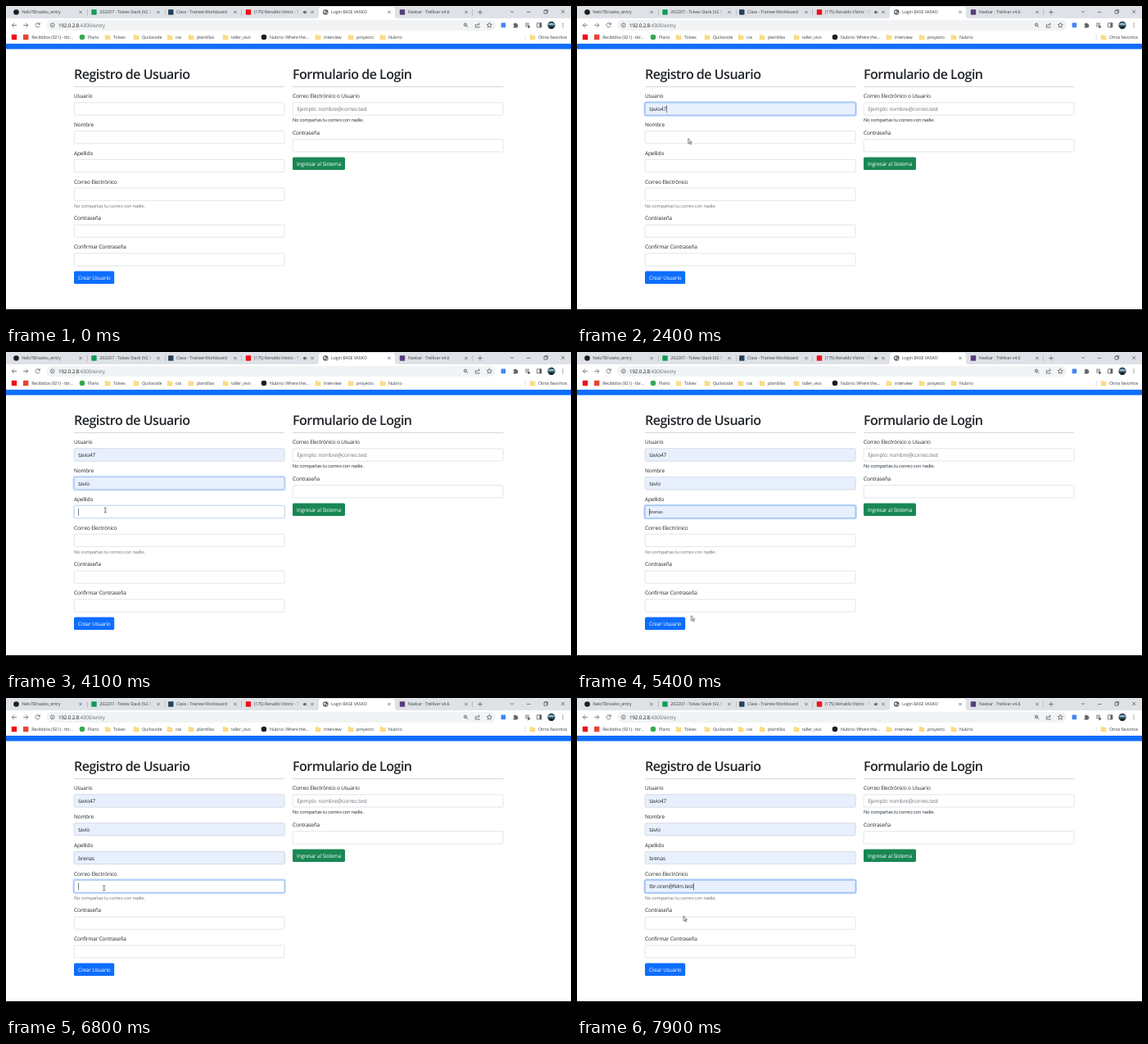
An HTML page for the animation above (8000 ms loop, 690 by 388 pixels).

```html
<!DOCTYPE html>
<html lang="es">
<head>
<meta charset="utf-8">
<title>Registro</title>
<style>
html, body { margin: 0; width: 100%; height: 100%; overflow: hidden; background: #fff; }
svg { display: block; width: 690px; height: 388px; }
text {
  font: 6.48px "Open Sans", "Noto Sans", sans-serif;
  letter-spacing: -.026em;
  text-rendering: geometricPrecision;
  fill: #212529;
  white-space: pre;
}
.ui { font-size: 5.39px; fill: #3c4043; }
.url { font-size: 6.28px; fill: #202124; }
.url tspan { fill: #6a6e73; }
.title { font-size: 16.1px; font-weight: 600; letter-spacing: -.034em; }
.help { font-size: 5.67px; fill: #6c757d; }
.hint { fill: #6c757d; }
.preview { font-size: 5.4px; }
.on { fill: #fff; }
.icon { fill: none; stroke: #5f6368; stroke-width: .8; }
.input { fill: #fff; stroke: #ced4da; stroke-width: .6; }
.filled { fill: #e8f0fe; stroke: #ced4da; stroke-width: .6; }
.ring { fill: none; stroke: #0d6efd; stroke-opacity: .25; stroke-width: 1.7; }
.edge { fill: none; stroke: #86b7fe; stroke-width: .7; }
.caret { fill: #212529; }
</style>
</head>
<body>
<svg id="stage" viewBox="0 0 690 388" xmlns="http://www.w3.org/2000/svg">
  <defs>
    <linearGradient id="fade">
      <stop offset="0" stop-color="#dee1e6" stop-opacity="0"/>
      <stop offset="1" stop-color="#dee1e6"/>
    </linearGradient>
  </defs>
  <rect width="690" height="388" fill="#fff"/>
  <rect width="690" height="15" fill="#dee1e6"/>
  <path d="M379 15q3 0 3-3V4q0-3 3-3h87q3 0 3 3v8q0 3 3 3z" fill="#fff"/>
  <g id="tabs"></g>
  <rect x="172" y="2" width="9" height="12" fill="url(#fade)"/>
  <rect x="181" y="2" width="2.5" height="12" fill="#dee1e6"/>
  <rect x="351" y="2" width="9" height="12" fill="url(#fade)"/>
  <rect x="360" y="2" width="11" height="12" fill="#dee1e6"/>
  <path d="M363 6.7h1.2l1.4-1.3v4.4l-1.4-1.3H363z" fill="#3c4043"/>
  <path class="icon" d="M366.6 6.2q.9 1.3 0 2.7"/>
  <path class="icon" d="M579 4.8v5.6M576.2 7.6h5.6M616 6l2 2 2-2M636 7.5h4.4M657 5.6h3.6v3.6H657zM658 5.6v-1h3.6v3.6h-1M678 4.8l4.2 4.2M682.2 4.8L678 9"/>

  <rect x="49" y="17" width="549" height="13" rx="6.5" fill="#f1f3f4"/>
  <g class="icon">
    <path d="M13 23.4H7.4M10 20.7l-2.7 2.7 2.7 2.7M21.2 23.4h5.6M24.2 20.7l2.7 2.7-2.7 2.7"/>
    <path d="M41 22.2a2.6 2.6 0 1 0 .1 2.1M41.3 20.3v2.1h-2.2"/>
    <circle cx="56.7" cy="23.4" r="2.4"/><path d="M56.7 23v1.7M56.7 21.7v.7"/>
    <g id="key"><circle cx="545.7" cy="23.4" r="1.4"/><path d="M547.1 23.4h3.4v1.6M549 23.4v1.2"/></g>
    <circle cx="561" cy="22.9" r="1.8"/><path d="M562.4 24.3l1.8 1.8M560.1 22.9h1.8"/>
    <path d="M574.3 22.5h-1v3.6h4.8v-1.3M574.8 24.6q.2-2.6 3.2-2.6M576.8 20.6l1.6 1.4-1.6 1.5"/>
    <path d="M590.3 20.2l.9 2.1 2.2.2-1.7 1.5.5 2.2-1.9-1.2-1.9 1.2.5-2.2-1.7-1.5 2.2-.2z"/>
    <path d="M634 21.2h5M634 23h5M634 24.8h2.4"/>
    <path d="M637.6 23.8l2.6 1.5-2.6 1.5z" fill="#5f6368"/>
    <path d="M648.5 20.8h5.4v5.2h-5.4z"/>
  </g>
  <rect x="651.4" y="20.8" width="2.5" height="5.2" fill="#5f6368"/>
  <rect x="604.6" y="20.6" width="5.6" height="5.6" rx=".6" fill="#4285f4"/>
  <path d="M619.6 21.6h1.5a1 1 0 0 1 2 0h1.5v1.5a1 1 0 0 1 0 2v1.5h-5v-1.5a1 1 0 0 0 0-2z" fill="#5f6368"/>
  <circle cx="666" cy="23.4" r="4.6" fill="#27414a"/>
  <path d="M661.8 22q4-3 8.4 0l-1 1.4h-6.4z" fill="#8db7c4"/>
  <path d="M663.4 27q2.6-3.6 5.2 0-2.6 1.7-5.2 0z" fill="#111b20"/>
  <g fill="#5f6368"><circle cx="680" cy="21.2" r=".65"/><circle cx="680" cy="23.4" r=".65"/><circle cx="680" cy="25.6" r=".65"/></g>
  <text class="url" x="64" y="25.6">192.0.2.8<tspan>:4300/entry</tspan></text>

  <g id="marks"></g>
  <rect x="633.8" y="34.5" width=".6" height="7" fill="#c9ccd0"/>
  <rect y="46" width="690" height="6.6" fill="#0d6efd"/>
  <rect y="370" width="690" height="18" fill="#000"/>
  <g id="page"></g>

  <g id="cursor">
    <path id="arrow" d="M0 0V6.2L1.5 4.9 2.5 7.2 3.5 6.8 2.5 4.6H4.4Z" fill="#fff" stroke="#222" stroke-width=".6"/>
    <path id="beam" d="M-1.4-3.1q1.4 0 1.4.7v4.8q0 .7-1.4.7M1.4-3.1Q0-3.1 0-2.4M1.4 3.1Q0 3.1 0 2.4" fill="none" stroke="#222" stroke-width=".7"/>
  </g>
</svg>
<script>
const LOOP = 8000;
const $ = id => document.getElementById(id);

function add(parent, tag, attrs, content = '') {
  const el = document.createElementNS('http://www.w3.org/2000/svg', tag);
  for (const k in attrs) el.setAttribute(k, attrs[k]);
  el.textContent = content;
  return parent.appendChild(el);
}
const label = (parent, cls, x, y, content) => add(parent, 'text', { class: cls, x, y }, content);

function play(el, frames) {
  el.animate(frames, { duration: LOOP, iterations: Infinity });
}

// Visible only inside the given [from, to] spans.
function show(el, ...spans) {
  const key = (ms, opacity) => ({ offset: ms / LOOP, opacity, easing: 'step-end' });
  play(el, [key(0, 0), ...spans.flatMap(([a, b]) => [key(a, 1), key(b, 0)]), key(LOOP, 0)]);
}

function glow(el, from, to) {
  const key = (ms, opacity) => ({ offset: Math.min(1, ms / LOOP), opacity });
  play(el, [key(0, 0), key(from, 0), key(from + 180, 1), key(to, 1), key(to + 180, 0), key(LOOP, 0)]);
}

// Browser tabs
function icon(parent, kind, x, y, fill) {
  if (kind === 'dot') add(parent, 'circle', { cx: x, cy: y, r: 3.3, fill });
  else if (kind === 'box') add(parent, 'rect', { x: x - 3.2, y: y - 3.2, width: 6.4, height: 6.4, rx: .6, fill });
  else add(parent, 'path', {
    d: `M${x - 3} ${y - 2.7}h2.4l.8.9h3v4.7h-6.2z`, fill: '#fbdc83', stroke: '#f3cd62', 'stroke-width': .3
  });
}
const tabs = $('tabs');
[
  [12.5, 'dot', '#1b1f23', 'NeloTB/vasko_entry', 91],
  [107.5, 'box', '#0f9d58', '202207 - Tolvex Stack (V2.1', 186],
  [201.3, 'box', '#24415c', 'Class - Trainee Workboard', 280],
  [296, 'box', '#f00f1c', '(175) Renaldo Vistriz - T', 374],
  [390.3, 'dot', '#5f6368', 'Login BASE VASKO', 468],
  [484, 'box', '#563d7c', 'Navbar · Trellivar v4.6', 562]
].forEach(([x, kind, fill, name, close]) => {
  icon(tabs, kind, x, 7.5, fill);
  label(tabs, 'ui', x + 6.8, 9.4, name);
  add(tabs, 'path', { class: 'icon', d: `M${close - 1.6} 5.9l3.2 3.2m0-3.2l-3.2 3.2` });
});
add(tabs, 'path', { d: 'M388.2 6.2q1.6-.9 2.2.3t-1.5 2.4zM391 8q1.6-.6 1.8.3l-1.2 1.4z', fill: '#fff' });
[99, 194, 287.5, 569].forEach(x => add(tabs, 'rect', { x, y: 4, width: .5, height: 7.5, fill: '#9a9da2' }));

// Bookmarks
[
  [10, 'box', '#f00f1c', ''],
  [24.2, 'box', '#ea4335', 'Recibidos (921) - tbr...'],
  [93, 'dot', '#34a853', 'Plano'],
  [124, 'folder', '', 'Tolvex'],
  [159, 'folder', '', 'Quilocode'],
  [200, 'folder', '', 'css'],
  [226, 'folder', '', 'plantillas'],
  [268, 'folder', '', 'taller_vivo'],
  [315, 'dot', '#1b1f23', 'Nubrio: Where the...'],
  [381, 'folder', '', 'interview'],
  [421, 'folder', '', 'proyecto'],
  [460, 'folder', '', 'Nubrio'],
  [643, 'folder', '', 'Otros favoritos']
].forEach(([x, kind, fill, name]) => {
  icon($('marks'), kind, x, 38, fill);
  label($('marks'), 'ui', x + 7, 39.9, name);
});

// Forms
const page = $('page');
const HINT = 'Ejemplo: nombre@correo.test';
const HELP = 'No compartas tu correo con nadie.';

function heading(x, name) {
  label(page, 'title', x, 88.8, name);
  add(page, 'rect', { x, y: 98.1, width: 257.2, height: .7, fill: '#c4c6c8' });
}

function button(x, y, width, fill, name) {
  add(page, 'rect', { x, y, width, height: 15.5, rx: 1.6, fill });
  label(page, 'on', x + 5.1, y + 10, name);
}

function field(x, y, name, { hint, act } = {}) {
  const box = (cls, grow = 0) => add(page, 'rect', {
    class: cls, x: x + .2 - grow, y: y - 7.6 - grow,
    width: 256.9 + 2 * grow, height: 15.2 + 2 * grow, rx: 1.6 + grow
  });
  const tx = x + 5.2, ty = y + 2.5;
  label(page, '', x, y - 13.2, name);
  box('input');
  if (hint) label(page, 'help', x, y + 15.8, HELP);
  const ghost = hint && label(page, 'hint', tx, ty, HINT);
  if (!act) return;

  const { focus, peek, pick, blur, value } = act;
  show(box('filled'), [peek, LOOP]);
  glow(box('ring', .9), focus, blur);
  glow(box('edge'), focus, blur);
  if (ghost) show(ghost, [0, peek]);
  show(label(page, 'preview', tx, ty - .3, value), [peek, pick]);
  const text = label(page, '', tx, ty, value);
  show(text, [pick, LOOP]);

  const caret = cx => add(page, 'rect', { class: 'caret', x: cx, y: y - 4.2, width: .6, height: 8.8 });
  const blinks = [];
  for (let t = focus; t < pick; t += 1020) blinks.push([t, Math.min(t + 510, pick)]);
  show(caret(tx), ...blinks);
  show(caret(tx + text.getComputedTextLength() + .2), [pick, blur]);
}

heading(83, 'Registro de Usuario');
field(83, 125.5, 'Usuario', { act: { focus: 1000, peek: 1850, pick: 2300, blur: 2680, value: 'tavio47' } });
field(83, 160.2, 'Nombre', { act: { focus: 2680, peek: 3400, pick: 3850, blur: 4050, value: 'tavio' } });
field(83, 195, 'Apellido', { act: { focus: 4050, peek: 5350, pick: 6170, blur: 6640, value: 'brenas' } });
field(83, 229.8, 'Correo Electrónico', { hint: true, act: { focus: 6640, peek: 7350, pick: 7650, blur: LOOP, value: 'tbr.oren@felm.test' } });
field(83, 274.6, 'Contraseña');
field(83, 309.4, 'Confirmar Contraseña');
button(83, 323.6, 49.2, '#0d6efd', 'Crear Usuario');

heading(350, 'Formulario de Login');
field(350, 125.5, 'Correo Electrónico o Usuario', { hint: true });
field(350, 170.3, 'Contraseña');
label(page, 'help', 350, 141.3, HELP);
button(350, 184.6, 64, '#198754', 'Ingresar al Sistema');

// Pointer: [ms, x, y]
show($('key'), [0, 2360]);
play($('cursor'), [
  [0, 170, 72], [700, 170, 72], [980, 117.2, 116.2], [1450, 117.2, 116.2],
  [1800, 135.8, 161.6], [2480, 135.8, 161.6], [2640, 126, 161], [3200, 126, 161],
  [3400, 138, 290], [3860, 138, 290], [4030, 121.3, 193], [5220, 121.3, 193],
  [5390, 139.4, 321.6], [6190, 139.4, 321.6], [6560, 119.7, 232], [7030, 119.7, 232],
  [7100, 123, 238], [7240, 123, 238], [7380, 130.1, 265.8], [LOOP, 130.1, 265.8]
].map(([ms, x, y]) => ({ offset: ms / LOOP, transform: `translate(${x}px, ${y}px)`, easing: 'ease-in-out' })));
show($('arrow'), [700, 2580], [3250, 3960], [5250, 6480], [7060, LOOP]);
show($('beam'), [2580, 3250], [3960, 5250], [6480, 7060]);
</script>
</body>
</html>
```
